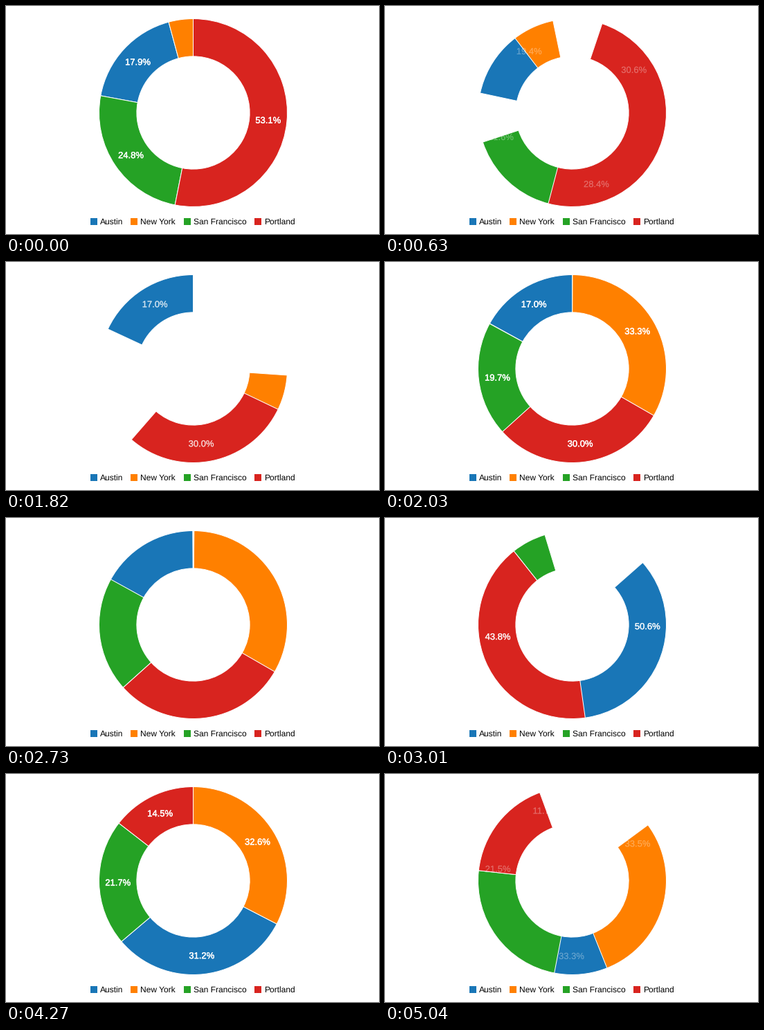
A matplotlib script that plays this animation: 539 px wide and 330 px high, repeating every 5110 ms.

```python
import numpy as np
import matplotlib.pyplot as plt
from matplotlib import patheffects
from matplotlib.animation import FuncAnimation
from matplotlib.patches import Rectangle, Wedge

WIDTH, HEIGHT, DPI = 539, 330, 64
PX = 72 / DPI  # one pixel in points
STEP, LOOP = 70, 5110

CENTER = (270.5, 154.5)
OUTER, INNER = 136, 81.6
LABEL_RADIUS = (OUTER + INNER) / 2
MIN_LABELLED = 5  # percent

CITIES = ["Austin", "New York", "San Francisco", "Portland"]
COLORS = ["#1976b7", "#ff8000", "#25a225", "#d8241f"]
LEGEND_X = [121.5, 180, 257, 358.5]

# Percentages per city, in legend order
STATES = np.array([
    [17.9, 4.2, 24.8, 53.1],
    [19.4, 21.6, 30.6, 28.4],
    [17.0, 33.3, 19.7, 30.0],
    [50.6, 2.3, 3.3, 43.8],
    [31.2, 32.6, 21.7, 14.5],
    [21.5, 11.7, 33.5, 33.3],
])

# (first visible change, settled, tween begin, tween duration) in ms
TRANSITIONS = [
    (560, 910, 470, 460),
    (1610, 2100, 1560, 500),
    (2730, 3150, 2695, 480),
    (3850, 4270, 3805, 500),
    (4900, LOOP + 300, 4866, 500),
]


def pie_layout(values):
    """Start and end angles, clockwise from the top, largest slice first."""
    order = np.argsort(-values)
    ends = np.empty(len(values))
    ends[order] = np.cumsum(values[order]) * 360 / values.sum()
    return np.column_stack([ends - values * 360 / values.sum(), ends])


def ease_cubic(u):
    u = min(max(u, 0), 1)
    return 4 * u**3 if u < 0.5 else 1 - 4 * (1 - u)**3


def state_at(ms):
    """Index of the newest state and the eased progress towards it."""
    index, progress = 0, 1
    for i, (first, settled, begin, duration) in enumerate(TRANSITIONS, 1):
        if ms >= first:
            index = i
            progress = 1 if ms >= settled else ease_cubic((ms - begin) / duration)
    return index, progress


LAYOUTS = [pie_layout(values) for values in STATES]

plt.rcParams["font.family"] = "Liberation Sans"
plt.rcParams["text.hinting"] = "none"
plt.rcParams["toolbar"] = "None"

fig = plt.figure(figsize=(WIDTH / DPI, HEIGHT / DPI), dpi=DPI, facecolor="white")
ax = fig.add_axes([0, 0, 1, 1])
ax.set_xlim(0, WIDTH)
ax.set_ylim(HEIGHT, 0)
ax.axis("off")

slices, labels = [], []
for city, color, x in zip(CITIES, COLORS, LEGEND_X):
    wedge = Wedge(CENTER, OUTER, 0, 90, width=OUTER - INNER, facecolor=color,
                  edgecolor="white", linewidth=PX, zorder=2)
    slices.append(ax.add_patch(wedge))
    labels.append(ax.text(
        0, 0, "", color="white", fontsize=13 * PX, ha="center", va="baseline", zorder=3,
        path_effects=[patheffects.withStroke(linewidth=0.35 * PX, foreground="white")]))
    ax.add_patch(Rectangle((x, 307), 10, 10, facecolor=color, linewidth=0))
    ax.text(x + 14.2, 316, city, color="black", fontsize=12 * PX, va="baseline")


def update(frame):
    index, progress = state_at(frame * STEP)
    target = LAYOUTS[index]
    previous = LAYOUTS[max(index - 1, 0)]
    angles = previous + (target - previous) * progress

    for i, (wedge, label) in enumerate(zip(slices, labels)):
        wedge.set_theta1(angles[i, 0] - 90)
        wedge.set_theta2(angles[i, 1] - 90)

        middle = np.radians(target[i].mean())
        value = STATES[index, i]
        label.set_position((CENTER[0] + LABEL_RADIUS * np.sin(middle),
                            CENTER[1] - LABEL_RADIUS * np.cos(middle) + 4.55))
        label.set_text(f"{value:.1f}%" if value > MIN_LABELLED else "")
        label.set_alpha(progress)
    return slices + labels


anim = FuncAnimation(fig, update, frames=LOOP // STEP, interval=STEP,
                     repeat=True, repeat_delay=0, blit=False)
plt.show()
```
